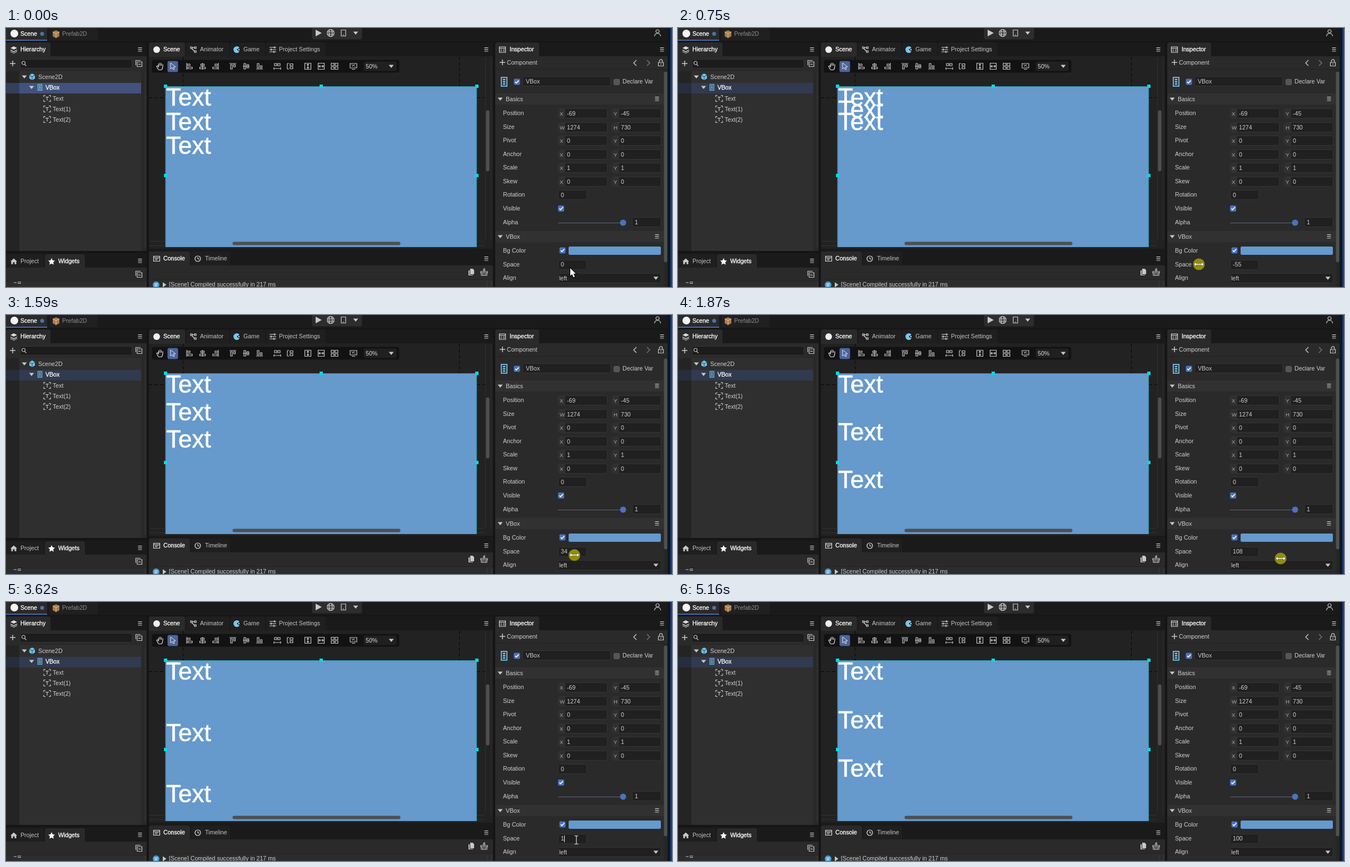
Write an HTML page with a canvas that moves like this. It is 1198 px wide and 467 px high and loops after 5220 ms.

```html
<!DOCTYPE html>
<html lang="en">
<head>
<meta charset="utf-8">
<title>VBox spacing</title>
<style>
html, body { margin: 0; width: 100%; height: 100%; overflow: hidden; background: #181818; }
canvas { display: block; width: 1198px; height: 467px; }
</style>
</head>
<body>
<canvas id="stage" width="1198" height="467"></canvas>
<script>
const W = 1198, H = 467, LOOP = 5220;
const FONT = '"Liberation Sans", Arial, sans-serif';
const ZOOM = 0.4396, FONT_SIZE = 100, LINE_HEIGHT = 99;
const PANEL = '#2a2a2a', BAR = '#1a1a1a', FIELD = '#202020', EDGE = '#343434';
const TEXT = '#cfcfcf', ICON = '#c8c8c8', BLUE = '#4b73bd', SKY = '#79c6ee';

const stage = document.getElementById('stage').getContext('2d');
const backdrop = document.createElement('canvas');
backdrop.width = W;
backdrop.height = H;
let g = backdrop.getContext('2d');

function rect(x, y, w, h, color) {
  g.fillStyle = color;
  g.fillRect(x, y, w, h);
}
function box(x, y, w, h, r, fill, edge) {
  g.beginPath();
  g.roundRect(x + .5, y + .5, w - 1, h - 1, r);
  if (fill) { g.fillStyle = fill; g.fill(); }
  if (edge) { g.strokeStyle = edge; g.lineWidth = 1; g.stroke(); }
}
function disc(x, y, r, color) {
  g.beginPath();
  g.arc(x, y, r, 0, Math.PI * 2);
  g.fillStyle = color;
  g.fill();
}
// White labels are slightly heavier than the rest.
function label(s, x, y, color = TEXT, size = 10.58) {
  g.font = `${size}px ${FONT}`;
  g.fillStyle = g.strokeStyle = color;
  g.fillText(s, x, y + 4);
  if (color === '#fff') {
    g.lineWidth = .2 + size * .01;
    g.strokeText(s, x, y + 4);
  }
}
// Path data is relative to the icon's centre.
function icon(x, y, path, color = ICON, fill = false, width = 1.2) {
  const p = new Path2D(path);
  g.save();
  g.translate(x, y);
  g.lineWidth = width;
  g.strokeStyle = g.fillStyle = color;
  fill ? g.fill(p) : g.stroke(p);
  g.restore();
}
const solid = (x, y, path, color) => icon(x, y, path, color, true);
const menu = (x, y) => solid(x, y, 'M-3.5-4h7v1.2h-7zM-3.5-.8h7v1.2h-7zM-3.5 2.4h7v1.2h-7z');
const down = (x, y) => solid(x, y, 'M-4.5-2.5h9L0 3z');
const plus = (x, y) => icon(x, y, 'M-5 0H5M0-5V5', ICON, false, 1.5);
const copies = (x, y) => icon(x, y, 'M-5.5 3v-8.5h8.5M-3-3h8.5v8.5h-8.5zM-1 1.3h4.5');
const vboxIcon = (x, y, k = 1) => {
  g.save();
  g.translate(x, y);
  g.scale(k, k);
  icon(0, 0, 'M-3.5-5.5h7v11h-7z', SKY, false, 1.2);
  solid(0, 0, 'M-1.6-3.7h3.2v1.8h-3.2zM-1.6-.9h3.2v1.8h-3.2zM-1.6 1.9h3.2v1.8h-3.2z', SKY);
  g.restore();
};
function check(x, y) {
  box(x - 6, y - 6, 12, 12, 2, BLUE);
  icon(x, y, 'M-3 0L-1 2.3L3.4-2.5', '#fff', false, 1.7);
}
function tab(x, y, w, h, s, tx, active) {
  g.beginPath();
  g.roundRect(x, y, w, h, [4, 4, 0, 0]);
  g.fillStyle = active ? PANEL : '#1f1f1f';
  g.fill();
  label(s, tx, y + 12, active ? '#fff' : '#c4c4c4');
}
const field = (x, y, w, s, tx = x + 5) => {
  box(x, y - 9, w, 18, 3, FIELD, EDGE);
  label(s, tx, y);
};
function axisField(x, y, axis, s) {
  field(x, y, 89, s, x + 16);
  rect(x + 1, y - 8, 12, 16, '#303030');
  label(axis, x + 3, y, '#aaa', 9.6);
}

function drawTopBar() {
  rect(0, 0, W, H, '#151515');
  rect(0, 0, W, 24, BAR);
  rect(0, 0, 74, 22, PANEL);
  rect(0, 21, 74, 2, '#4668a8');
  disc(15, 10, 7, '#f4f4f4');
  label('Scene', 26, 10, '#fff');
  disc(65, 10.5, 3.5, '#4d70b4');
  rect(78, 0, 87, 22, '#202020');
  solid(90, 11, 'M-6-4L0-7L6-4V4L0 7L-6 4z', '#a77a4d');
  icon(90, 11, 'M-6-4L0-1L6-4M0-1V7', '#e0b783');
  label('Prefab2D', 101, 10, '#8d8d8d');
  box(550, -5, 91, 26, 4, '#2d2d2d');
  solid(562, 9, 'M-5-6L6 0L-5 6z');
  icon(584, 9, 'M-6.3 0a6.3 6.3 0 1 0 12.6 0a6.3 6.3 0 1 0-12.6 0M-2.8 0a2.8 6.3 0 1 0 5.6 0a2.8 6.3 0 1 0-5.6 0M-6-2.2h12M-6 2.2h12');
  icon(607, 9, 'M-4-5.5h8v11h-8zM-1 3.5h2');
  down(629, 9);
  icon(1172, 9, 'M-3-3a3 3 0 1 0 6 0a3 3 0 1 0-6 0M-5.5 6c0-7 11-7 11 0');
}

function drawHierarchy() {
  rect(0, 26, 253, 376, BAR);
  rect(0, 51, 253, 351, PANEL);
  tab(0, 26, 80, 26, 'Hierarchy', 26, true);
  solid(14, 39, 'M0-6L6-3L0 0L-6-3zM-6 0L0 3L6 0V1.5L0 4.5L-6 1.5zM-6 3L0 6L6 3V4L0 7L-6 4z', '#dcdcdc');
  menu(241, 39);
  plus(12, 64);
  box(25, 56, 202, 17, 3, '#1c1c1c', EDGE);
  icon(32, 64, 'M-3.5-1a3 3 0 1 0 6 0a3 3 0 1 0-6 0M1.5 1.5L4.5 4.5');
  copies(239, 64);
  rect(0, 78, 253, 324, '#2f2f2f');
  rect(0, 78, 24, 324, '#242424');
  rect(243, 78, 10, 324, '#292929');
  rect(250, 80, 1, 316, '#3a3a3a');
}

function drawTree(focused) {
  rect(0, 99, 243, 19, focused ? '#42527c' : '#323a50');
  rect(0, 99, 24, 19, focused ? '#343f5c' : '#272d3d');
  down(33, 88);
  solid(47, 88, 'M-5-3L0-6L5-3V3L0 6L-5 3z', SKY);
  icon(47, 88, 'M-5-3L0 0L5-3M0 0V6', '#2c5573');
  label('Scene2D', 58, 88);
  down(46, 107);
  vboxIcon(61, 107);
  label('VBox', 71, 107, '#fff');
  ['Text', 'Text(1)', 'Text(2)'].forEach((s, i) => {
    const y = 127 + i * 19;
    icon(74, y, 'M-3-5.5h-3v3M3-5.5h3v3M-3 5.5h-3v-3M3 5.5h3v-3M-3-2.5h6M0-2.5v6');
    label(s, 84, y);
  });
}

function drawProject() {
  rect(0, 406, 253, 61, BAR);
  rect(0, 432, 253, 35, PANEL);
  tab(0, 408, 68, 24, 'Project', 26, false);
  tab(70, 408, 72, 25, 'Widgets', 94, true);
  solid(14, 421, 'M0-5.5L6 0H4.5V5H1.5V1.5H-1.5V5H-4.5V0H-6z');
  solid(82, 421, 'M0-6L1.9-2L6-1.5L3 1.5L3.8 5.8L0 3.7L-3.8 5.8L-3 1.5L-6-1.5L-1.9-2z', '#fff');
  menu(241, 420);
  copies(239, 444);
  rect(0, 456, 253, 11, '#2d2d2d');
  rect(0, 456, 253, 1, '#242424');
  icon(20, 459, 'M-6 0h5M1-1h6M1 1.5h6');
  rect(250, 457, 1, 10, '#3a3a3a');
}

function drawScene() {
  rect(257, 26, 619, 376, BAR);
  rect(257, 51, 619, 347, '#222');
  tab(257, 26, 65, 26, 'Scene', 283, true);
  tab(324, 26, 78, 25, 'Animator', 349, false);
  tab(404, 26, 62, 25, 'Game', 427, false);
  tab(468, 26, 107, 25, 'Project Settings', 491, false);
  disc(271, 39, 6, '#f0f0f0');
  icon(337, 39, 'M-5-5h3v3h-3zM2-5h3v3h-3zM2 2h3v3h-3zM-2-3.5h4M-3-2l5 5', '#ddd');
  solid(415, 39, 'M0 0L5-3.5A6 6 0 1 0 5 3.5z', SKY);
  disc(419, 39, 1.2, '#eee');
  icon(480, 39, 'M-6-4h12M-6 0h12M-6 4h12M3-6v4M-3-2v4M2 2v4', '#ddd');
  menu(864, 39);

  g.setLineDash([6, 4]);
  icon(0, 0, 'M318.5 52V384M815.5 52V384M257 125.5H862', '#060606', false, 1);
  g.setLineDash([]);
  box(262, 57, 446, 24, 4, '#121212');
  box(290, 59, 20, 21, 3, '#4a659c');
  icon(277, 69, 'M-3 6L-6 0L-4-1L-2.5 1V-4.5M-2.5 0V-5M0-1V-6.5M2.5-1V-5.5M5 0V-3.5M5-1C5 2 5 4 3 6.5H-3', '#ddd');
  icon(300, 69, 'M-4-6L5 1L1 1.5L3 5.5L1 6L-1 2.5L-4 5z', '#e8e8e8', false, 1);
  const align = ['M-5-6V6M-3-4H1V-1H-3zM-3 1.5H5V4.5H-3z', 'M0-6V6M-3-4H3V-1H-3zM-5 1.5H5V4.5H-5z', 'M5-6V6M-1-4H3V-1H-1zM-5 1.5H3V4.5H-5z'];
  align.forEach((p, i) => icon(330 + i * 23.5, 69, p));
  ['M-6-5H6M-4-3H-1V5H-4zM1.5-3H4.5V1H1.5z', 'M-6 0H6M-4-5H-1V5H-4zM1.5-3H4.5V3H1.5z', 'M-6 5H6M-4-5H-1V3H-4zM1.5-1H4.5V3H1.5z']
    .forEach((p, i) => icon(408 + i * 24, 69, p));
  icon(488, 69, 'M-5-5H-1V-1H-5zM1-5H5V-1H1zM-6 4H6M-6 2V6M6 2V6');
  icon(511, 69, 'M-5-5V5M-5-5H-2M-5 5H-2M0-4.5H5V-1H0zM0 1H5V4.5H0z');
  icon(543, 69, 'M-5.5-5.5H5.5V5.5H-5.5zM0-4V4M-2-2L0-4L2-2M-2 2L0 4L2 2');
  icon(567, 69, 'M-5.5-5.5H5.5V5.5H-5.5zM-4 0H4M-2-2L-4 0L-2 2M2-2L4 0L2 2');
  icon(591, 69, 'M-6-5.5H-1V-1H-6zM1-5.5H6V-1H1zM-6 1H-1V5.5H-6zM1 1H6V5.5H1z');
  icon(625, 69, 'M-6-5H6V3H-6zM-3 5.5H3M-2 0L2-3M-2-3L-3-2M2 0L3 1');
  box(643, 60, 60, 18, 3, '#202020');
  label('50%', 647, 69, '#ddd');
  down(693, 69);

  rect(257, 395, 619, 3, '#222');
  rect(287, 105, 560, 290, '#6699cc');
  icon(0, 0, 'M287 395V105.5H846.5V395', '#27939f', false, 1);
  rect(862, 52, 1, 330, '#303030');
  rect(872, 52, 1, 330, '#303030');
  box(863, 148, 7, 111, 3, '#505050');
  rect(258, 384, 29, 1, '#323232');
  rect(847, 384, 14, 1, '#323232');
  rect(258, 392, 29, 1, '#323232');
  rect(847, 392, 14, 1, '#323232');
  box(407, 385, 303, 7, 3, '#4d4f52');
}

function drawHandles() {
  for (const [x, y] of [[287, 105], [567, 105], [847, 105], [287, 266], [847, 266]])
    rect(x - 3, y - 3, 6, 6, '#00dbe2');
}

function drawConsole() {
  rect(257, 402, 619, 65, BAR);
  rect(257, 428, 619, 39, PANEL);
  tab(257, 403, 74, 26, 'Console', 283, true);
  tab(333, 403, 70, 25, 'Timeline', 358, false);
  icon(271, 416, 'M-5.5-4.5H5.5V4.5H-5.5zM-5.5-2H5.5M-3 0H3M-3 2H1', '#ddd');
  icon(345, 416, 'M-5 0a5 5 0 1 0 10 0a5 5 0 1 0-10 0M0-3V0L3 1M-5 0h-1', '#ddd');
  menu(864, 416);
  solid(837, 440, 'M-2-6H2.5L5-3.5V4H-2zM-5-3H-3V5H3V6H-5z');
  icon(860, 440, 'M-6-1H6V1.5H-6zM-5 2V6H5V2M-1-1V-5L1-6V-1M-2 3V6M2 3V6');
  rect(257, 453, 619, 1, '#222');
  rect(257, 454, 619, 13, '#2c2c2c');
  rect(865, 456, 1, 11, '#3a3a3a');
  rect(873, 456, 1, 11, '#3a3a3a');
  disc(270, 463, 6, '#4a9fd5');
  solid(270, 463, 'M-3-2H3V-.8H-3zM-3 1H2V2.2H-3z', '#fff');
  solid(285, 463, 'M-3-4.5L3.5 0L-3 4.5z');
  label('[Scene] Compiled successfully in 217 ms', 293, 462);
}

function sectionHeader(s, y) {
  rect(880, y - 10, 303, 20, '#313131');
  down(889, y);
  label(s, 899, y);
  menu(1171, y);
}

function drawInspector() {
  rect(880, 26, 310, 441, BAR);
  rect(880, 51, 310, 416, PANEL);
  tab(880, 26, 79, 26, 'Inspector', 906, true);
  icon(893, 39, 'M-5.5-5H5.5V5H-5.5zM-5.5-2.5H5.5M-3.5 0H-1M1 0H4M-3.5 2.5H-1M1 2.5H4', '#ddd');
  menu(1180, 39);
  plus(893, 62);
  label('Component', 901, 62);
  icon(1132, 63, 'M2-5L-3 0L2 5', ICON, false, 1.4);
  icon(1155, 63, 'M-2-5L3 0L-2 5', '#777', false, 1.4);
  icon(1178, 63, 'M-4.5-1H4.5V5.5H-4.5zM-2.7-1V-3.5a2.7 2.7 0 0 1 5.4 0V-1M0 1V3');
  rect(880, 74, 310, 1, '#232323');
  vboxIcon(896, 97, 1.45);
  check(919, 97);
  field(929, 96, 159, 'VBox', 935);
  box(1093, 92, 11, 11, 2, '#555', '#626262');
  label('Declare Var', 1109, 96);
  sectionHeader('Basics', 128);

  const pairs = [['Position', 'X', -69, 'Y', -45], ['Size', 'W', 1274, 'H', 730], ['Pivot', 'X', 0, 'Y', 0],
    ['Anchor', 'X', 0, 'Y', 0], ['Scale', 'X', 1, 'Y', 1], ['Skew', 'X', 0, 'Y', 0]];
  pairs.forEach(([name, a, va, b, vb], i) => {
    const y = Math.floor(153.5 + i * 24.5);
    label(name, 894, y);
    axisField(993, y + 1, a, va);
    axisField(1090, y + 1, b, vb);
  });
  label('Rotation', 894, 300);
  field(993, 301, 52, '0');
  label('Visible', 894, 325);
  check(998.5, 325.5);
  label('Alpha', 894, 350);
  rect(993, 351, 117, 1, '#5b6780');
  disc(1110, 351, 5.5, BLUE);
  field(1126, 350, 53, '1');
  sectionHeader('VBox', 376);
  label('Bg Color', 894, 401);
  check(1001, 401);
  box(1011, 393, 168, 17, 3, '#6699cc', '#202a36');
  label('Space', 894, 426);
  field(993, 427, 52, '');
  label('Align', 894, 450);
  field(993, 451, 186, 'left', 995);
  down(1169, 451);
  rect(1183, 76, 7, 391, '#262626');
  box(1183, 78, 7, 345, 3, '#505050');
  rect(1190, 0, 5, H, '#161616');
  rect(1195, 0, 3, H, '#123f8a');
}

// Key poses: [time, values...], linear in between.
const PATH = [[0, 1015, 433], [70, 1008, 431], [260, 985, 427], [400, 984, 427], [750, 937, 426], [960, 928, 426],
  [1100, 929, 426], [1310, 948, 428], [1660, 1041, 434], [1870, 1084, 439], [2220, 1116, 441],
  [2500, 1116, 441], [2780, 1025, 428], [3030, 1024, 429], [3180, 1026, 429], [4250, 1026, 429], [4770, 1124, 443]];
const SPACE = [[400, 0], [680, -49], [750, -55], [1000, -69], [1170, -67], [1240, -62], [1310, -52],
  [1660, 56], [1800, 96], [1870, 108], [2150, 148], [2290, 152]];

function sample(keys, t) {
  const i = keys.findIndex(k => k[0] > t);
  if (i === 0) return keys[0].slice(1);
  if (i < 0) return keys[keys.length - 1].slice(1);
  const a = keys[i - 1], b = keys[i], f = (t - a[0]) / (b[0] - a[0]);
  return a.slice(1).map((v, n) => v + (b[n + 1] - v) * f);
}
const spaceAt = t => Math.round(sample(SPACE, t)[0]);

function outlined(x, y, path, width = 2) {
  icon(x, y, path, '#000', false, width);
  solid(x, y, path, '#fff');
}
function drawCursor(t, x, y) {
  if (t >= 5160) return;
  const dragging = t >= 400 && t < 2560;
  if (dragging) disc(x, y, 10.5, '#8f8c12');
  if (t >= 260 && t < 2560 || t >= 2740 && t < 2830)
    outlined(x, y, 'M-8.5 0L-5-3V-.7H5V-3L8.5 0L5 3V.7H-5V3z', dragging ? .4 : 1.4);
  else if (t >= 2830 && x < 1045)
    icon(x, y, 'M-3.5-7.5H-1L0-6.5L1-7.5H3.5M0-6.5V6.5M-3.5 7.5H-1L0 6.5L1 7.5H3.5', '#ddd', false, 1.2);
  else
    outlined(x, y, 'M0 0V14L3.3 11L5.8 16.5L8.2 15.5L5.7 10H10z');
}

function drawSpaceValue(t, moment) {
  if (t >= 3030 && t < 3620) rect(998, 420, 18, 13, '#3768b5');
  const s = t < 3620 ? spaceAt(moment) : t < 3830 ? '1' : '100';
  label(s, 998, 426);
  if (t >= 3620 && t < 4830) rect(t < 3830 ? 1004 : 1016, 421, 1, 12, '#eee');
}

function draw(t) {
  const moment = t < 62 ? 0 : 50 + 70 * Math.floor((t - 38) / 70);
  g = stage;
  g.drawImage(backdrop, 0, 0);
  drawTree(t < 350);
  const space = t < 4830 ? spaceAt(moment - 70) : 100;
  for (let i = 0; i < 3; i++)
    label('Text', 288, 136.3 + i * (LINE_HEIGHT + space) * ZOOM, '#fff', FONT_SIZE * ZOOM);
  drawHandles();
  drawSpaceValue(t, moment);
  drawCursor(t, ...sample(PATH, moment));
}

[drawTopBar, drawHierarchy, drawProject, drawScene, drawConsole, drawInspector].forEach(f => f());
const start = performance.now();
function frame() {
  draw((performance.now() - start) % LOOP);
  requestAnimationFrame(frame);
}
frame();
</script>
</body>
</html>
```
